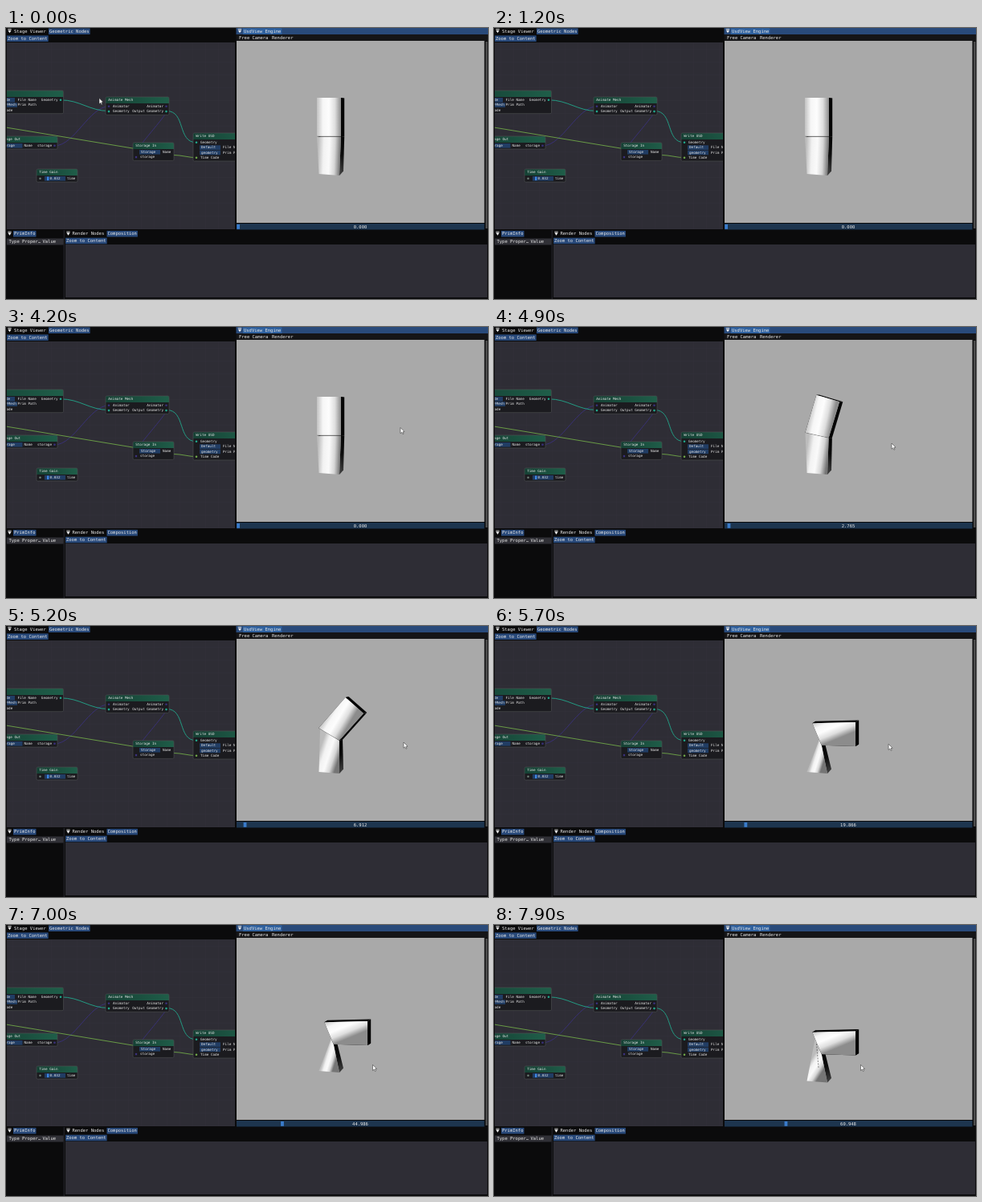
Write an HTML page with a canvas that moves like this. It is 600 px wide and 338 px high and loops after 8 s.

```html
<!DOCTYPE html>
<html lang="en">
<head>
<meta charset="utf-8">
<title>Node editor and viewport</title>
<style>
  html, body { margin: 0; width: 100%; height: 100%; overflow: hidden; background: #0b0b0c; }
  canvas { display: block; width: 100vw; height: 100vh; }
</style>
</head>
<body>
<canvas id="stage"></canvas>
<script>
const W = 600, H = 338, LOOP = 8000, STEP = 100;
const canvas = document.getElementById('stage');
const c = canvas.getContext('2d');
const MONO = '"DejaVu Sans Mono", "Liberation Mono", monospace';
const TEAL = '#22a88c', GREEN = '#70a848', PURPLE = '#3a317c';
const FIELD = '#213d64', TAB = '#28497a', PANEL = '#2e2d35', BLACK = '#050505';

const clamp01 = x => Math.max(0, Math.min(1, x));
const lerp = (a, b, k) => a + (b - a) * k;
const mix = (p, q, k) => [lerp(p[0], q[0], k), lerp(p[1], q[1], k)];
const add = (p, q) => [p[0] + q[0], p[1] + q[1]];
const span = (t, from, to) => clamp01((t - from) / (to - from));

// ---- drawing helpers ----

function rect(x, y, w, h, fill) {
  c.fillStyle = fill;
  c.fillRect(x, y, w, h);
}

function text(s, x, y, size = 5.5, align = 'left') {
  c.font = size + 'px ' + MONO;
  c.textAlign = align;
  c.textBaseline = 'middle';
  c.fillStyle = '#e8e8e8';
  c.fillText(s, x, y);
}

function poly(points, fill) {
  c.beginPath();
  points.forEach(p => c.lineTo(p[0], p[1]));
  c.closePath();
  c.fillStyle = fill;
  c.fill();
}

function stroke(color, width) {
  c.strokeStyle = color;
  c.lineWidth = width;
  c.stroke();
}

function line(p, q, color, width) {
  c.beginPath();
  c.moveTo(...p);
  c.lineTo(...q);
  stroke(color, width);
}

// Gradient between two points, with evenly spaced colours
function shade(p, q, ...colors) {
  const g = c.createLinearGradient(...p, ...q);
  colors.forEach((s, i) => g.addColorStop(i / (colors.length - 1), s));
  return g;
}

function link(p, q, pull, color) {
  c.beginPath();
  c.moveTo(...p);
  c.bezierCurveTo(p[0] + pull, p[1], q[0] - pull, q[1], ...q);
  stroke(color, 0.9);
}

function menuMark(x, y) {
  rect(x - 2.2, y - 2.8, 4.4, 0.8, '#f0f0f0');
  poly([[x - 2.2, y - 1.2], [x + 2.2, y - 1.2], [x, y + 2.2]], '#f0f0f0');
}

function tab(s, x, y, fill = TAB) {
  rect(x - 1, y - 3.8, s.length * 3.31 + 2, 7.6, fill);
  text(s, x, y);
}

// ---- node editor ----

const label = (s, dx) => ({ s, dx });
const field = (s, dx, w) => ({ s, dx, w });
const input = (s, color) => ({ s, dx: 9, pinAt: 4, color });
const output = (s, color) => ({ s, right: true, color });

function pin(x, y, color) {
  c.beginPath();
  c.arc(x, y, 1.3, 0, 7);
  c.fillStyle = color;
  c.fill();
}

function node(title, x, y, w, ...rows) {
  c.beginPath();
  c.roundRect(x, y, w, 9.8 + 6.3 * rows.length, 1.5);
  c.fillStyle = '#1b1b1f';
  c.fill();
  c.save();
  c.clip();
  rect(x, y, w, 8, shade([x, y], [x + w, y + 8], '#154034', '#1f5e49'));
  c.restore();
  stroke('#4e5153', 0.6);
  text(title, x + 3.2, y + 4.3, 4.3);
  rows.forEach((items, i) => {
    const ry = y + 11.8 + 6.3 * i;
    for (const it of items) {
      if (it.w) rect(x + it.dx - 2, ry - 2.8, it.w, 5.6, FIELD);
      if (it.right) text(it.s, x + w - 7, ry, 4.3, 'right');
      else text(it.s, x + it.dx, ry, 4.3);
      if (it.color) pin(it.right ? x + w - 3.5 : x + it.pinAt, ry, it.color);
    }
  });
}

function nodeCanvas() {
  c.save();
  c.beginPath();
  c.rect(1, 18, 284, 233);
  c.clip();
  rect(1, 18, 284, 233, PANEL);
  for (let x = 8; x < 285; x += 16) rect(x, 18, 0.5, 233, '#32313a');
  for (let y = 26; y < 251; y += 16) rect(1, y, 284, 0.5, '#32313a');

  link([61, 146.8], [128, 97.8], 24, PURPLE);
  link([201, 97.8], [161, 161], 12, PURPLE);
  link([68, 89.8], [128, 103.5], 24, TEAL);
  link([200, 103.5], [237, 142.8], 24, TEAL);
  line([0, 124], [209, 158.5], GREEN, 0.9);
  link([209, 158.5], [237, 161.7], 9, GREEN);

  node('', -40, 78, 111.5,
    [field('de', 40, 13), label('File Name', 54.5), output('Geometry', TEAL)],
    [field('/Mesh', 40, 16), label('Prim Path', 54.5)],
    [label('ode', 40.5)]);
  node('Animate Mesh', 124, 86, 79,
    [input('Animator', PURPLE), output('Animator', PURPLE)],
    [input('Geometry', TEAL), output('Output Geometry', TEAL)]);
  node('Storage Out', -13.5, 135, 77.5,
    [field('rage', 14, 22), label('Name', 36), output('storage', PURPLE)]);
  node('Storage In', 158, 143, 51,
    [field('Storage', 10, 26), label('Name', 37)],
    [input('storage', PURPLE)]);
  node('Write USD', 233, 131, 70,
    [input('Geometry', TEAL)],
    [field('Default', 10, 26), label('File N', 37)],
    [field('geometry', 10, 26), label('Prim P', 37)],
    [input('Time Code', GREEN)]);
  node('Time Gain', 38, 176, 51,
    [{ s: '', pinAt: 4.5, color: '#6d7d75' }, field('', 12, 26), label('time', 38)]);
  rect(51, 185.5, 2.4, 4.6, '#3d85e0');
  text('0.032', 61, 187.8, 4.3, 'center');
  c.restore();
}

// ---- window layout ----

function panels() {
  rect(0, 0, W, H, '#0b0b0c');

  menuMark(4.5, 4);
  text('Stage Viewer', 10, 4.2);
  tab('Geometric Nodes', 54, 4.2);
  tab('Zoom to Content', 2, 13.2);
  nodeCanvas();

  rect(286.5, 0, 313.5, 8, '#294a7a');
  menuMark(291, 4);
  tab('UsdView Engine', 296, 4.2, '#3062a0');
  rect(286.5, 8, 313.5, 8, '#151517');
  text('Free Camera', 290, 12.2);
  text('Renderer', 331, 12.2);
  rect(287, 16, 308.5, 227, '#a9a9a9');
  rect(597, 17, 2.4, 233, '#4f4f4f');

  menuMark(4.5, 256.5);
  tab('PrimInfo', 10, 256.7);
  rect(1, 262.5, 70.5, 8, '#303036');
  text('Type', 3.5, 267);
  text('Proper…', 20, 267);
  text('Value', 45.5, 267);
  rect(71.8, 252, 0.7, 86, '#35353c');

  menuMark(77.5, 256.5);
  text('Render Nodes', 82.5, 256.7);
  tab('Composition', 126.5, 256.7);
  tab('Zoom to Content', 75, 265.5);
  rect(74, 270, 525, 66, PANEL);
}

function slider(value) {
  rect(287, 244, 308.5, 7.5, '#1d354f');
  rect(287.2 + value * 1.22, 245, 3.8, 5.8, '#3a7ccb');
  text(value.toFixed(3), 441, 248.2, 5.5, 'center');
}

// ---- bending column ----

// The upper half turns rigidly about the pivot; the joint lags behind it
function column(value, drop) {
  const bend = clamp01(value / 15);
  const pivot = [402, 135], half = 15, length = 48;
  const turn = (x, y, k) => {
    const a = bend * k * Math.PI / 2, s = Math.sin(a), o = Math.cos(a);
    return add(pivot, [x * o - y * s, x * s + y * o]);
  };
  const jointL = turn(-half, 0, 0.75), jointR = turn(half, 0, 0.75);
  const arm = [jointL, turn(-half, -length, 1), turn(half, -length, 1), jointR];
  const depth = [4.2, 0.5 - 3 * bend];

  const pinch = 0.75 * bend ** 3 * (1 - 0.6 * drop);
  const kneeL = mix(jointL, jointR, pinch);
  const footL = [389.5, 182], footR = [415, 184], footBack = [420, 178.5];

  c.save();
  c.translate(0, 12.5 * drop);
  poly([jointR, add(jointR, depth), footBack, footR],
    shade(jointR, footBack, BLACK, '#0c0c0c', '#383838'));
  poly([kneeL, jointR, footR, footL],
    shade(mix(kneeL, footL, 0.5), mix(jointR, footR, 0.5), '#bcbcbc', '#f2f2f2', '#fafafa', '#d6d6d6', '#757575'));

  arm.forEach((p, i) => {
    const q = arm[(i + 1) % 4];
    poly([p, q, add(q, depth), add(p, depth)], BLACK);
  });
  poly(arm, shade(jointL, jointR, '#c2c2c2', '#f6f6f6', '#fdfdfd', '#dedede', '#8c8c8c'));

  line(jointL, jointR, `rgba(90,90,90,${0.5 * (1 - bend)})`, 0.6);
  c.setLineDash([2, 1.5]);
  line([401.5, 135.5], [404, 165.5], `rgba(50,50,50,${0.8 * drop})`, 0.7);
  c.restore();
}

// ---- motion ----

// Playback starts slowly, then settles at a steady rate
function clock(t) {
  return 6.912 * span(t, 4700, 5200) + 12.954 * span(t, 5200, 5700)
    + 25.12 * span(t, 5700, 7000) + 15.962 * span(t, 7000, 7900);
}

function pointer(t) {
  if (t < 1200) return mix([116, 87.5], [512, 116], span(t, 0, 1100));
  if (t < 3500) return null;
  let p = mix([588, 128], [482, 92], span(t, 3500, 3900));
  p = mix(p, [491, 125.5], span(t, 4000, 4200));
  p = mix(p, [495, 145], span(t, 4200, 4600));
  p = mix(p, [460, 165], span(t, 5600, 6500));
  return mix(p, [456.5, 174.3], span(t, 6500, 7000));
}

function cursor(p) {
  const shape = [[0, 0], [0, 7.2], [1.7, 5.7], [2.9, 8.2], [4, 7.7], [2.9, 5.3], [5, 5.1]];
  poly(shape.map(q => add(p, q)), '#fff');
  stroke('#222', 0.5);
}

function draw(t) {
  const value = clock(t), at = pointer(t);
  panels();
  column(value, span(t, 7400, 7900));
  slider(value);
  if (at) cursor(at);
}

function resize() {
  const d = window.devicePixelRatio || 1;
  canvas.width = Math.round(innerWidth * d);
  canvas.height = Math.round(innerHeight * d);
}

const start = performance.now();
function loop() {
  const t = (performance.now() - start) % LOOP;
  c.setTransform(canvas.width / W, 0, 0, canvas.height / H, 0, 0);
  draw(Math.floor(t / STEP) * STEP);
  requestAnimationFrame(loop);
}

addEventListener('resize', resize);
resize();
loop();
</script>
</body>
</html>
```
